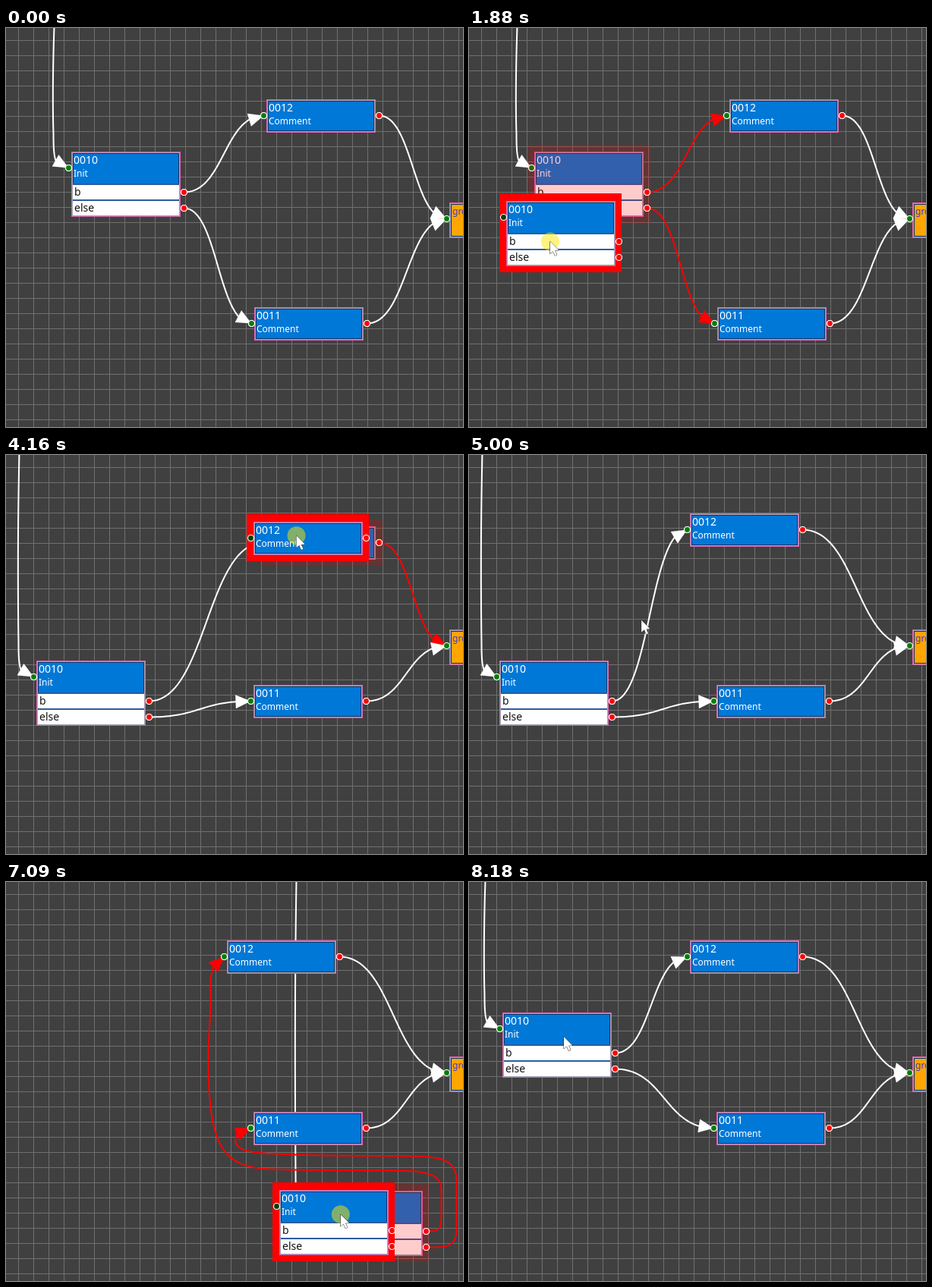
Animation, 602 px wide and 526 px high, one loop 8420 ms. Source, as an HTML page with a canvas:

```html
<!DOCTYPE html>
<html lang="en">
<head>
<meta charset="utf-8">
<title>Flow editor</title>
<style>
html, body { margin: 0; width: 100%; height: 100%; overflow: hidden; background: #404040; }
canvas { display: block; }
</style>
</head>
<body>
<canvas id="stage" width="602" height="526"></canvas>
<script>
const ctx = document.getElementById('stage').getContext('2d');
const LOOP = 8420, W = 144;
const FONT = '"Noto Sans", "Open Sans", sans-serif';

// Committed positions: [time, x, y]
const nodes = {
  init: { id: '0010', label: 'Init', rows: ['b', 'else'], h: 86,
    at: [[0, 86, 163], [2190, 40, 271], [6250, 405, 407], [8030, 44, 172]] },
  top: { id: '0012', label: 'Comment', rows: [], h: 44, at: [[0, 343, 94], [4680, 291, 77]] },
  low: { id: '0011', label: 'Comment', rows: [], h: 44, at: [[0, 327, 368], [3560, 326, 303]] }
};
const goal = [580, 251];

// [node, press, first move, release]
const drags = [
  ['init', 940, 1570, 2190],
  ['low', 3060, 3130, 3560],
  ['top', 3920, 3990, 4680],
  ['init', 5400, 5470, 6250],
  ['init', 6950, 7000, 8030]
];

const ease = {
  lin: k => k,
  in: k => k * k,
  out: k => 1 - (1 - k) * (1 - k),
  both: k => k * k * (3 - 2 * k)
};

// Pointer keys: [time, x, y, easing into the key]
const pointer = [
  [80, 307, 432], [790, 144, 217, 'both'],
  [1500, 144, 217, 'lin'], [1570, 140, 217, 'lin'], [1880, 107, 281, 'in'], [2030, 98, 325, 'out'],
  [2190, 98, 325, 'lin'], [2660, 398, 383, 'both'],
  [3060, 398, 383, 'lin'], [3300, 398, 346, 'in'], [3480, 397, 318, 'out'],
  [3560, 397, 318, 'lin'], [3840, 400, 112, 'both'],
  [3920, 400, 112, 'lin'], [4540, 348, 95, 'both'],
  [4680, 348, 95, 'lin'], [5000, 228, 217, 'in'], [5230, 127, 302, 'out'],
  [5400, 127, 302, 'lin'], [5920, 446, 428, 'both'], [6070, 492, 438, 'out'],
  [6250, 492, 438, 'lin'], [6400, 486, 439, 'out'],
  [6950, 486, 439, 'lin'], [7090, 442, 439, 'in'], [7630, 125, 204, 'out']
];

function pointerAt(t) {
  const i = pointer.findIndex(k => k[0] > t);
  if (i < 1) return (i ? pointer[pointer.length - 1] : pointer[0]).slice(1, 3);
  const a = pointer[i - 1], b = pointer[i];
  const k = ease[b[3]]((t - a[0]) / (b[0] - a[0]));
  return [a[1] + (b[1] - a[1]) * k, a[2] + (b[2] - a[2]) * k];
}

const placeAt = (node, t) => node.at.filter(k => k[0] <= t).pop().slice(1);
const inPort = ([x, y]) => [x - 4, y + 21];
const outPort = ([x, y], row) => [x + W + 4, y + (row === undefined ? 21 : 53 + 21 * row)];

function box(x, y, w, h, color) {
  ctx.fillStyle = color;
  ctx.fillRect(x, y, w, h);
}

function text(s, x, y, size, color) {
  ctx.font = `${size}px ${FONT}`;
  ctx.fillStyle = color;
  ctx.fillText(s, x, y);
}

function port([x, y], color) {
  ctx.beginPath();
  ctx.arc(x + .5, y + .5, 4, 0, Math.PI * 2);
  ctx.fillStyle = color;
  ctx.fill();
  ctx.strokeStyle = '#fff';
  ctx.lineWidth = 1.2;
  ctx.stroke();
}

function grid() {
  box(0, 0, 602, 526, '#404040');
  for (let p = 16; p < 602; p += 20) {
    box(p, 0, 1, 526, '#707070');
    box(0, p, 602, 1, '#707070');
  }
}

function frame(x, y, w, h, fill) {
  box(x, y, w, h, '#d862ac');
  box(x + 1, y + 1, w - 2, h - 2, '#a2a2b4');
  box(x + 2, y + 2, w - 4, h - 4, '#10326c');
  box(x + 3, y + 3, w - 6, h - 6, fill);
}

function drawNode(node, [x, y], green = '#008000') {
  frame(x, y, W, node.h, '#0078d7');
  text(node.id, x + 3, y + 16, 14, '#fff');
  text(node.label, x + 3, y + 33, 12, '#fff');
  node.rows.forEach((row, i) => {
    const top = y + 42 + 21 * i;
    box(x + 2, top, W - 4, 21, '#2c5c9e');
    box(x + 2, top + 2, W - 4, 19, '#fff');
    text(row, x + 4, top + 16, 14, '#111');
  });
  port(inPort([x, y]), green);
  if (node.rows.length) node.rows.forEach((_, i) => port(outPort([x, y], i), '#f00'));
  else port(outPort([x, y]), '#f00');
}

// Flat list of coordinates: start point, then three points per cubic
function sample(c) {
  const pts = [[c[0], c[1]]];
  for (let i = 0; i + 7 < c.length; i += 6) {
    for (let s = 1; s <= 40; s++) {
      const t = s / 40, u = 1 - t;
      const mix = j => u * u * u * c[j] + 3 * u * u * t * c[j + 2] + 3 * u * t * t * c[j + 4] + t * t * t * c[j + 6];
      pts.push([mix(i), mix(i + 1)]);
    }
  }
  return pts;
}

function drawEdge(curve, color) {
  const pts = sample(curve), [x, y] = pts[pts.length - 1];
  let n = pts.length - 1;
  while (n > 0 && Math.hypot(pts[n][0] - x, pts[n][1] - y) < 19) n--;
  ctx.strokeStyle = ctx.fillStyle = color;
  ctx.lineWidth = 2;
  ctx.beginPath();
  pts.slice(0, n + 2).forEach(p => ctx.lineTo(p[0] + .5, p[1] + .5));
  ctx.stroke();
  ctx.save();
  ctx.translate(x + .5, y + .5);
  ctx.rotate(Math.atan2(y - pts[n][1], x - pts[n][0]));
  ctx.beginPath();
  ctx.moveTo(0, 0);
  ctx.lineTo(-20, -9);
  ctx.lineTo(-20, 9);
  ctx.fill();
  ctx.restore();
}

function forward([x1, y1], [x2, y2]) {
  const m = (x1 + x2) / 2;
  return [x1, y1, m, y1, m, y2, x2, y2];
}

const entry = ([x, y]) => [x - 19, -2, x - 21, y * .3, x - 21, y * .6, x - 20, y - 45,
  x - 20, y - 10, x - 18, y, x, y];

// Routes that lead back to a node on the left
const backTop = [553, 460, 570, 460, 573, 458, 573, 440, 573, 430, 573, 415, 573, 405,
  573, 388, 560, 381, 520, 380, 440, 379, 400, 380, 345, 378,
  285, 374, 266, 350, 266, 230, 266, 205, 269, 180, 269, 150, 269, 125, 268, 104, 287, 98];
const backLow = [553, 481, 585, 482, 593, 478, 593, 455, 593, 435, 593, 415, 593, 395,
  593, 370, 580, 362, 540, 361, 480, 360, 400, 361, 360, 358,
  318, 357, 301, 352, 302, 340, 302, 330, 308, 326, 322, 324];

function drawPointer([x, y], pressed) {
  if (pressed) {
    ctx.beginPath();
    ctx.arc(x, y, 12, 0, Math.PI * 2);
    ctx.fillStyle = 'rgba(255,232,0,.5)';
    ctx.fill();
  }
  ctx.save();
  ctx.translate(x, y);
  ctx.fillStyle = '#fff';
  ctx.strokeStyle = '#222';
  ctx.lineWidth = 1;
  ctx.stroke(arrow);
  ctx.fill(arrow);
  ctx.restore();
}
const arrow = new Path2D('M0 0V16L3.7 12.6 6.4 18.6 9 17.4 6.3 11.7 11.3 11.4Z');

function render(t) {
  const drag = drags.find(d => t >= d[1] && t < d[3]);
  const held = drag && drag[0];
  const pos = {};
  for (const name in nodes) pos[name] = placeAt(nodes[name], t);
  const tint = name => name === held ? '#f00' : '#fff';
  const back = pos.init[0] > pos.low[0];

  grid();
  frame(584, 230, 60, 47, '#ffa500');
  text('group', 588, 246, 12, '#4038c4');

  drawEdge(entry(inPort(pos.init)), '#fff');
  for (const name in nodes) drawNode(nodes[name], pos[name]);
  if (held) {
    const [x, y] = pos[held];
    box(x - 8, y - 9, 161, nodes[held].h + 17, 'rgba(255,0,0,.2)');
  }
  ['top', 'low'].forEach((name, i) => {
    const route = back ? [backTop, backLow][i] : forward(outPort(pos.init, i), inPort(pos[name]));
    drawEdge(route, tint('init'));
    drawEdge(forward(outPort(pos[name]), goal), tint(name));
    port(inPort(pos[name]), '#008000');
    port(outPort(pos[name]), '#f00');
    port(outPort(pos.init, i), '#f00');
  });
  port(inPort(pos.init), held === 'init' ? '#336600' : '#008000');
  port(goal, '#008000');

  const tip = pointerAt(t);
  if (drag && t >= drag[2]) {
    const from = pointerAt(drag[1]);
    const [x, y] = pos[held].map((v, i) => Math.round(v + tip[i] - from[i]));
    box(x - 9, y - 10, 161, nodes[held].h + 18, '#f00');
    drawNode(nodes[held], [x, y], '#004000');
  }
  if (t >= 80) drawPointer(tip, !!drag);
}

const start = performance.now();
function tick() {
  render((performance.now() - start) % LOOP);
  requestAnimationFrame(tick);
}
tick();
</script>
</body>
</html>
```
